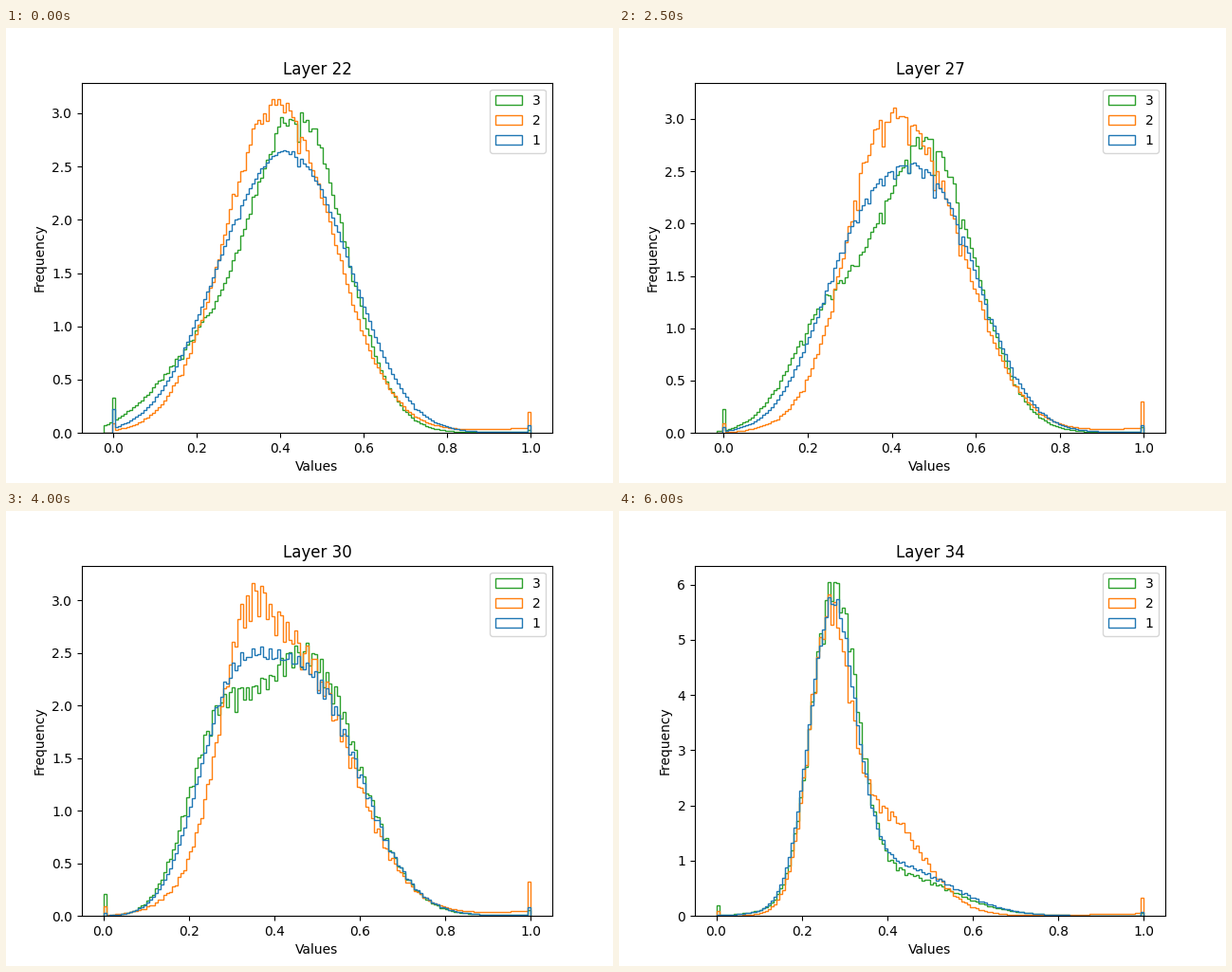
Animation of 640x480 px, one loop 6.5 s. Source, as a matplotlib script:

```python
import numpy as np
import matplotlib.pyplot as plt
from matplotlib.animation import FuncAnimation

FIRST, LAST, BINS = 22, 34, 150

# Two-bell mixtures at a few layers: weight of the first bell,
# its centre and width, then centre and width of the second.
KEYS = [22, 29, 31, 34]
BLUE = [(.42, .310, .120, .475, .122), (.36, .315, .100, .510, .116),
        (.25, .267, .062, .440, .131), (.68, .270, .053, .405, .135)]
ORANGE = [(.13, .360, .100, .405, .133), (.13, .345, .060, .465, .130),
          (.22, .305, .056, .425, .132), (.53, .262, .046, .378, .100)]
GREEN = [(.19, .210, .110, .444, .111), (.25, .262, .085, .500, .112),
         (.25, .263, .060, .445, .130), (.72, .275, .0525, .400, .140)]

# Curve, noise, right-hand floor, and (first, last) heights of the
# bars at zero and one.
SERIES = [(BLUE, .004, .010, (.22, .02), (.07, .08)),
          (ORANGE, .016, .050, (.09, .09), (.20, .33)),
          (GREEN, .016, .010, (.33, .20), (.03, .06))]


def low_edge(layer):
    return np.interp(layer, [22, 24, 25, 27, 29],
                     [-.0236, -.0320, -.0318, -.0174, 0])


def top_value(layer):
    return np.interp(layer, [22, 24, 25, 27, 29, 31, 33, 34],
                     [3.13, 3.13, 3.154, 3.187, 3.068, 3.277, 4.92, 6.04])


def bell(x, centre, width):
    z = (x - centre) / width
    return np.exp(-z * z / 2) / (width * np.sqrt(2 * np.pi))


def density(x, layer, shapes):
    w, c1, s1, c2, s2 = [np.interp(layer, KEYS, p) for p in zip(*shapes)]
    return w * bell(x, c1, s1) + (1 - w) * bell(x, c2, s2)


def comb(edges, mid, coarse):
    """Ripple from half-precision values falling unevenly into the bins."""
    step = 2.0 ** (np.floor(np.log2(np.maximum(mid, .01))) - 10)
    if coarse:
        step = np.maximum(step, 2.0 ** -11)
    count = np.floor(edges[1:] / step) - np.floor(edges[:-1] / step)
    return count * step / np.diff(edges)


def heights(layer, index, edges, mid):
    shapes, noise, floor, zero_bar, one_bar = SERIES[index]
    rng = np.random.default_rng(100 * layer + index)
    h = density(mid, layer, shapes) * comb(edges, mid, index > 0)
    h *= 1 + noise * rng.standard_normal(BINS)
    h += floor * np.maximum(mid, 0) ** 4

    fade = ((LAST - layer) / (LAST - FIRST)) ** 3
    zero = int(np.searchsorted(edges, 1e-9)) - 1
    if index < 2:
        h[:zero] = 0
    for k, (start, stop) in ((zero, zero_bar), (-1, one_bar)):
        h[k] = stop + (start - stop) * fade
    return np.minimum(h, top_value(layer))


fig, ax = plt.subplots(figsize=(6.4, 4.8), dpi=100)


def draw(i):
    layer = FIRST + i
    low = low_edge(layer)
    edges = np.linspace(low, 1, BINS + 1)
    mid = (edges[1:] + edges[:-1]) / 2

    ax.clear()
    data = [heights(layer, s, edges, mid) for s in range(3)]
    _, _, patches = ax.hist([mid] * 3, edges, weights=data,
                            histtype="step", color=["C0", "C1", "C2"])
    pad = .05 * (1 - low)
    ax.set_xlim(low - pad, 1 + pad)
    ax.set_ylim(0, 1.05 * top_value(layer))
    ax.set_title(f"Layer {layer}")
    ax.set_xlabel("Values")
    ax.set_ylabel("Frequency")
    ax.legend([p[0] for p in patches[::-1]], ["3", "2", "1"],
              loc="upper right")


anim = FuncAnimation(fig, draw, frames=LAST - FIRST + 1, interval=500,
                     init_func=lambda: None, repeat=True, repeat_delay=0)
plt.show()
```
